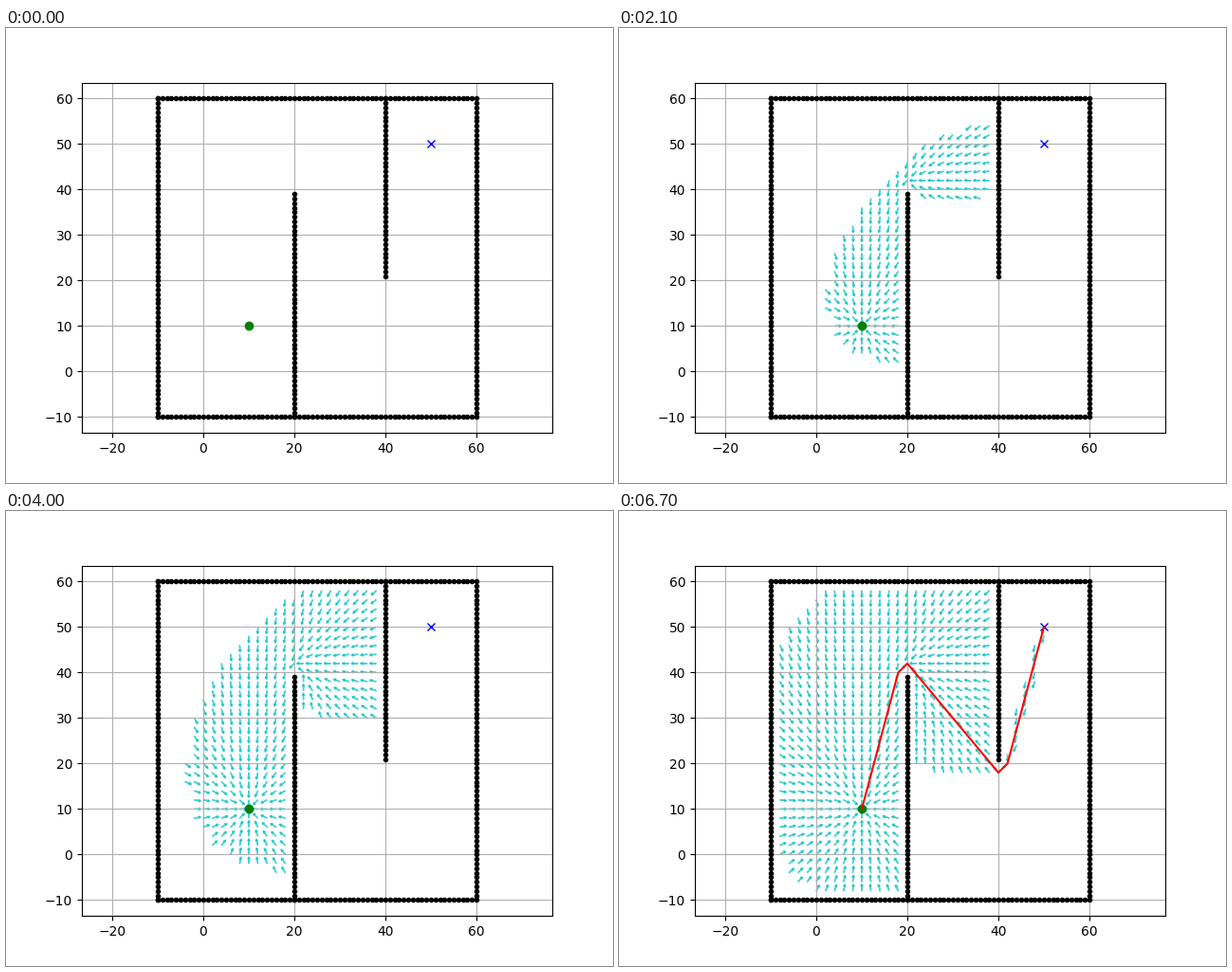
Write a matplotlib script that moves like this. It is 640 px wide and 480 px high and loops after 7200 ms.

```python
"""Any-angle grid search (Theta*) around two walls, animated."""
import math

import matplotlib.pyplot as plt
from matplotlib.animation import FuncAnimation
from matplotlib.collections import PatchCollection
from matplotlib.patches import FancyArrow

STEP = 2            # grid spacing
RADIUS = 1.0        # robot radius
LOW, HIGH = -10, 60
START, GOAL = (10, 10), (50, 50)
FRAMES, INTERVAL = 72, 100
PATH_FRAME = 67     # search is over, the path appears
PER_FRAME = 10      # nodes expanded per frame

MOVES = [(1, 0), (0, 1), (-1, 0), (0, -1),
         (-1, -1), (-1, 1), (1, -1), (1, 1)]


def make_walls():
    walls = [(x, LOW) for x in range(LOW, HIGH)]
    walls += [(HIGH, y) for y in range(LOW, HIGH)]
    walls += [(x, HIGH) for x in range(LOW, HIGH + 1)]
    walls += [(LOW, y) for y in range(LOW, HIGH + 1)]
    walls += [(20, y) for y in range(LOW, 40)]
    walls += [(40, HIGH - i) for i in range(40)]
    return walls


def to_cell(point):
    return tuple((v - LOW) // STEP for v in point)


def to_point(cell):
    return tuple(v * STEP + LOW for v in cell)


def free_cells(walls):
    size = (HIGH - LOW) // STEP
    cells = ((i, j) for i in range(size) for j in range(size))
    return {c for c in cells
            if all(math.dist(to_point(c), w) > RADIUS for w in walls)}


def in_sight(a, b, free):
    """Walk a Bresenham line from a to b through free cells only."""
    (x, y), (x1, y1) = a, b
    dx, dy = abs(x1 - x), abs(y1 - y)
    sx = 1 if x < x1 else -1
    sy = 1 if y < y1 else -1
    err = dx - dy
    while (x, y) in free:
        if (x, y) == b:
            return True
        e2 = 2 * err
        if e2 > -dy:
            err -= dy
            x += sx
        if e2 < dx:
            err += dx
            y += sy
    return False


def search(start, goal, free):
    """Return (cell, parent) pairs in order of expansion, and the path."""
    opened = {start: (0.0, None)}
    closed = {}
    order = []
    while opened:
        cell = min(opened, key=lambda c: opened[c][0] + math.dist(c, goal))
        cost, parent = closed[cell] = opened.pop(cell)
        if parent is not None:
            order.append((cell, parent))
        if cell == goal:
            break
        for move in MOVES:
            near = (cell[0] + move[0], cell[1] + move[1])
            if near not in free or near in closed:
                continue
            entry = (cost + math.hypot(*move), cell)
            if parent is not None and in_sight(parent, near, free):
                entry = (closed[parent][0] + math.dist(parent, near), parent)
            if near not in opened or opened[near][0] > entry[0]:
                opened[near] = entry

    path = [goal]
    while closed[path[-1]][1] is not None:
        path.append(closed[path[-1]][1])
    return order, path


def make_arrow(cell, parent):
    (x, y), (px, py) = to_point(cell), to_point(parent)
    dist = math.hypot(px - x, py - y)
    return FancyArrow(x, y, (px - x) / dist, (py - y) / dist,
                      width=0.001, head_width=0.5, head_length=0.5)


walls = make_walls()
order, path = search(to_cell(START), to_cell(GOAL), free_cells(walls))
arrows = [make_arrow(*pair) for pair in order]

fig, ax = plt.subplots(figsize=(6.4, 4.8), dpi=100)
ax.plot(*zip(*walls), ".k")
ax.plot(*START, "og")
ax.plot(*GOAL, "xb")
ax.grid(True)
ax.axis("equal")

field = PatchCollection([], facecolor="c", edgecolor="c", linewidth=1,
                        alpha=0.7, joinstyle="miter", capstyle="butt")
ax.add_collection(field, autolim=False)
route, = ax.plot(*zip(*map(to_point, path)), "-r", visible=False)


def update(i):
    done = i >= PATH_FRAME
    field.set_paths(arrows if done else arrows[:i * PER_FRAME])
    route.set_visible(done)
    return field, route


anim = FuncAnimation(fig, update, frames=FRAMES, interval=INTERVAL,
                     repeat=True, repeat_delay=0)
plt.show()
```
